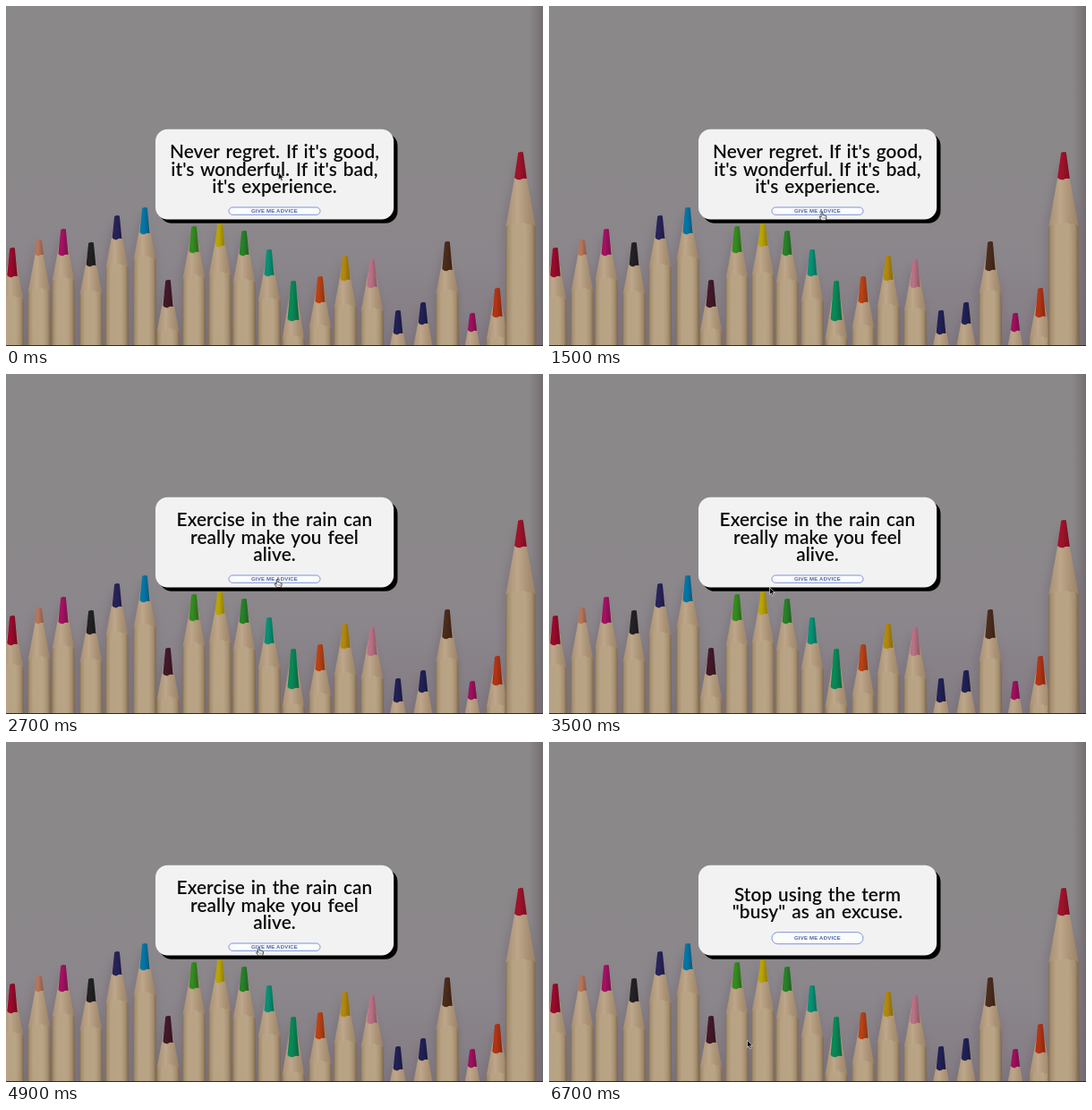
An HTML page for the animation above (6.8 s loop, 600 by 380 pixels).

```html
<!DOCTYPE html>
<html lang="en">
<head>
<meta charset="utf-8">
<title>Advice card</title>
<style>
  html, body { margin: 0; width: 100%; height: 100%; overflow: hidden; background: #8a888a; }
  svg { display: block; }
  .quote { font: 600 20.8px Lato, "Open Sans", sans-serif; word-spacing: 1.6px; letter-spacing: .08px; fill: #0b0b0b; text-anchor: middle; }
  .label { font: bold 6px "Liberation Sans", Arial, sans-serif; letter-spacing: .22px; fill: #4a62a8; text-anchor: middle; }
</style>
</head>
<body>
<svg width="600" height="380" viewBox="0 0 600 380">
  <defs>
    <linearGradient id="wall" x1="0" y1="0" x2="0" y2="1">
      <stop offset="0" stop-color="#8a8889"/>
      <stop offset=".45" stop-color="#8b888a"/>
      <stop offset=".75" stop-color="#8b868b"/>
      <stop offset="1" stop-color="#837c83"/>
    </linearGradient>
    <linearGradient id="edge">
      <stop offset="0" stop-color="#756e72" stop-opacity="0"/>
      <stop offset="1" stop-color="#6f686b" stop-opacity=".85"/>
    </linearGradient>
    <linearGradient id="body">
      <stop offset="0" stop-color="#7d6850"/>
      <stop offset=".09" stop-color="#a48e70"/>
      <stop offset=".25" stop-color="#b7a283"/>
      <stop offset=".65" stop-color="#b9a485"/>
      <stop offset=".85" stop-color="#a58f70"/>
      <stop offset="1" stop-color="#796249"/>
    </linearGradient>
    <linearGradient id="cone">
      <stop offset="0" stop-color="#a68f73"/>
      <stop offset=".4" stop-color="#bda689"/>
      <stop offset="1" stop-color="#9a8165"/>
    </linearGradient>
    <linearGradient id="shade">
      <stop offset=".4" stop-color="#000" stop-opacity="0"/>
      <stop offset="1" stop-color="#000" stop-opacity=".25"/>
    </linearGradient>
    <filter id="soft" x="-10%" y="-10%" width="120%" height="120%"><feGaussianBlur stdDeviation="4"/></filter>
  </defs>
  <rect width="600" height="380" fill="url(#wall)"/>
  <rect x="584" width="16" height="380" fill="url(#edge)"/>
  <g id="shadows" fill="#6a5d6c" opacity=".35" filter="url(#soft)"></g>
  <g id="pencils"></g>
  <rect y="379" width="600" height="1" fill="#2c2927"/>
  <rect x="171.5" y="142.5" width="266" height="100.3" rx="13.5"/>
  <rect x="167" y="137.7" width="266.2" height="100.7" rx="13.5" fill="#f2f2f2"/>
  <g id="quote" class="quote"></g>
  <rect id="button" x="249" width="102" fill="#fafbfd" stroke="#7189cf" stroke-width=".9"/>
  <text id="label" class="label" x="300">GIVE ME ADVICE</text>
  <g id="arrow">
    <path d="M0 0V8.2L1.9 6.5L3.2 9.5L4.7 8.8L3.4 6H6Z" fill="#0c0c0c" stroke="#e8e8e8" stroke-width=".65" stroke-linejoin="round"/>
  </g>
  <g id="hand">
    <path d="M-.9 0Q0-1.2.9 0V3L1.7 2.6Q2.5 2.5 2.7 3.3Q3.7 2.9 4 3.7Q5 3.4 5 4.6V6L4 8.5H-.4L-2.7 5.4Q-3.2 4.3-2.1 4.3L-.9 5.2Z" fill="#f7f7f7" stroke="#161616" stroke-width=".75" stroke-linejoin="round"/>
    <path d="M1 5V7M2.3 5V7M3.6 5V7" stroke="#333" stroke-width=".4"/>
  </g>
</svg>
<script>
const $ = id => document.getElementById(id);
const LOOP = 6800, STEP = 100;

// tip x, tip y, lead end y, colour, half width
const pencils = [
  [7, 270, 304, '#980a2b'], [37, 261, 280, '#b5755c'], [64, 249, 280, '#a11263'],
  [95, 264, 292, '#222123'], [124, 234, 262, '#28235a'], [155, 225, 256, '#0675a6'],
  [181, 306, 338, '#431929'], [210, 246, 277, '#358a20'], [239, 243, 270, '#b9a304'],
  [266, 251, 280, '#27802a'], [294, 272, 303, '#089075'], [321, 307, 353, '#0a8757'],
  [351, 302, 333, '#b74215'], [379, 279, 308, '#b0880d'], [409, 283, 316, '#b87285'],
  [438, 340, 368, '#202155'], [466, 331, 357, '#202154'], [493, 263, 297, '#4a2c1e'],
  [521, 343, 365, '#9d105d'], [549, 315, 349, '#b03415'], [575, 163, 195, '#9e132b', 17.5]
];

function drawPencil([x, top, lead, color, half = 13.3]) {
  const upper = half - .8, bottom = 384;
  const shoulder = Math.max(top + 56, lead + 17) + (half - 13.3) * 6;
  const w = half * .29 + (lead - top) * .055;
  const cone = `M${x - 2.6} ${top + 6}L${x - upper} ${shoulder + 3}H${x + upper}L${x + 2.6} ${top + 6}Z`;
  const shape = `M${x - upper} ${shoulder + 2}Q${x - upper * .55} ${shoulder - 4} ${x - upper * .28} ${shoulder + 1}` +
    `Q${x + upper * .15} ${shoulder - 5} ${x + upper * .45} ${shoulder}Q${x + upper * .75} ${shoulder - 3} ${x + upper} ${shoulder + 2}` +
    `L${x + half} ${bottom}H${x - half}Z`;
  const tip = `M${x - 2.8} ${top + 1}Q${x} ${top - .8} ${x + 2.8} ${top + .5}L${x + w} ${lead - 2}` +
    `Q${x + w * .4} ${lead - 3} ${x} ${lead - 1}Q${x - w * .5} ${lead} ${x - w} ${lead - 3}Z`;
  $('shadows').innerHTML += `<path d="M${x - 4} ${top + 4}L${x - half - 3} ${shoulder}V384H${x + half}V${shoulder}Z"/>`;
  $('pencils').innerHTML += `<path d="${cone}" fill="url(#cone)"/><path d="${shape}" fill="url(#body)"/>` +
    `<path d="M${x - half * .38} ${shoulder + 6}V384M${x + half * .5} ${shoulder + 6}V384" stroke="#c9b595" stroke-opacity=".25" stroke-width=".7"/>` +
    `<path d="${tip}" fill="${color}"/><path d="${tip}" fill="url(#shade)"/>`;
}
pencils.forEach(drawPencil);

const quotes = [
  { from: 0, lines: ["Never regret. If it's good,", "it's wonderful. If it's bad,", "it's experience."] },
  { from: 1700, lines: ['Exercise in the rain can', 'really make you feel', 'alive.'] },
  { from: 5200, lines: ['Stop using the term', '"busy" as an excuse.'] }
];

// time, x, y of the pointer
const path = [
  [0, 304.5, 186], [200, 304.5, 188], [700, 305.5, 231], [1000, 306, 235.5],
  [1400, 305, 231], [2000, 304.5, 230], [2800, 303, 230], [3500, 246.5, 238.5],
  [4200, 263, 239], [4900, 282.5, 230.3], [5200, 282, 230.3], [5800, 251, 328], [6700, 221.5, 333.3]
];

function pointerAt(t) {
  const i = Math.max(1, path.findIndex(p => p[0] >= t));
  const [t0, x0, y0] = path[i - 1], [t1, x1, y1] = path[i];
  const u = (t - t0) / (t1 - t0), e = u * u * (3 - 2 * u);
  return [x0 + (x1 - x0) * e, y0 + (y1 - y0) * e];
}

let shown;
function showQuote(quote) {
  if (quote === shown) return;
  shown = quote;
  const two = quote.lines.length === 2;
  const base = two ? 177.5 : 170;
  $('quote').innerHTML = quote.lines
    .map((line, i) => `<text x="300" y="${base + i * 19.5}">${line}</text>`).join('');
  const y = two ? 212.7 : 225, h = two ? 13 : 8.3;
  $('button').setAttribute('y', y);
  $('button').setAttribute('height', h);
  $('button').setAttribute('rx', h / 2);
  $('label').setAttribute('y', y + h / 2 + 2.15);
  quote.box = [y, y + h];
}

function draw(now) {
  const t = Math.floor(now % LOOP / STEP) * STEP;
  const quote = quotes.filter(q => q.from <= t).pop();
  showQuote(quote);
  const [x, y] = pointerAt(t);
  const over = x > 249 && x < 351 && y >= quote.box[0] && y <= quote.box[1];
  for (const [id, on] of [['arrow', !over], ['hand', over]]) {
    $(id).setAttribute('transform', `translate(${x} ${y})`);
    $(id).style.display = on ? '' : 'none';
  }
}

const begin = performance.now();
function tick() {
  draw(performance.now() - begin);
  requestAnimationFrame(tick);
}
tick();
</script>
</body>
</html>
```
